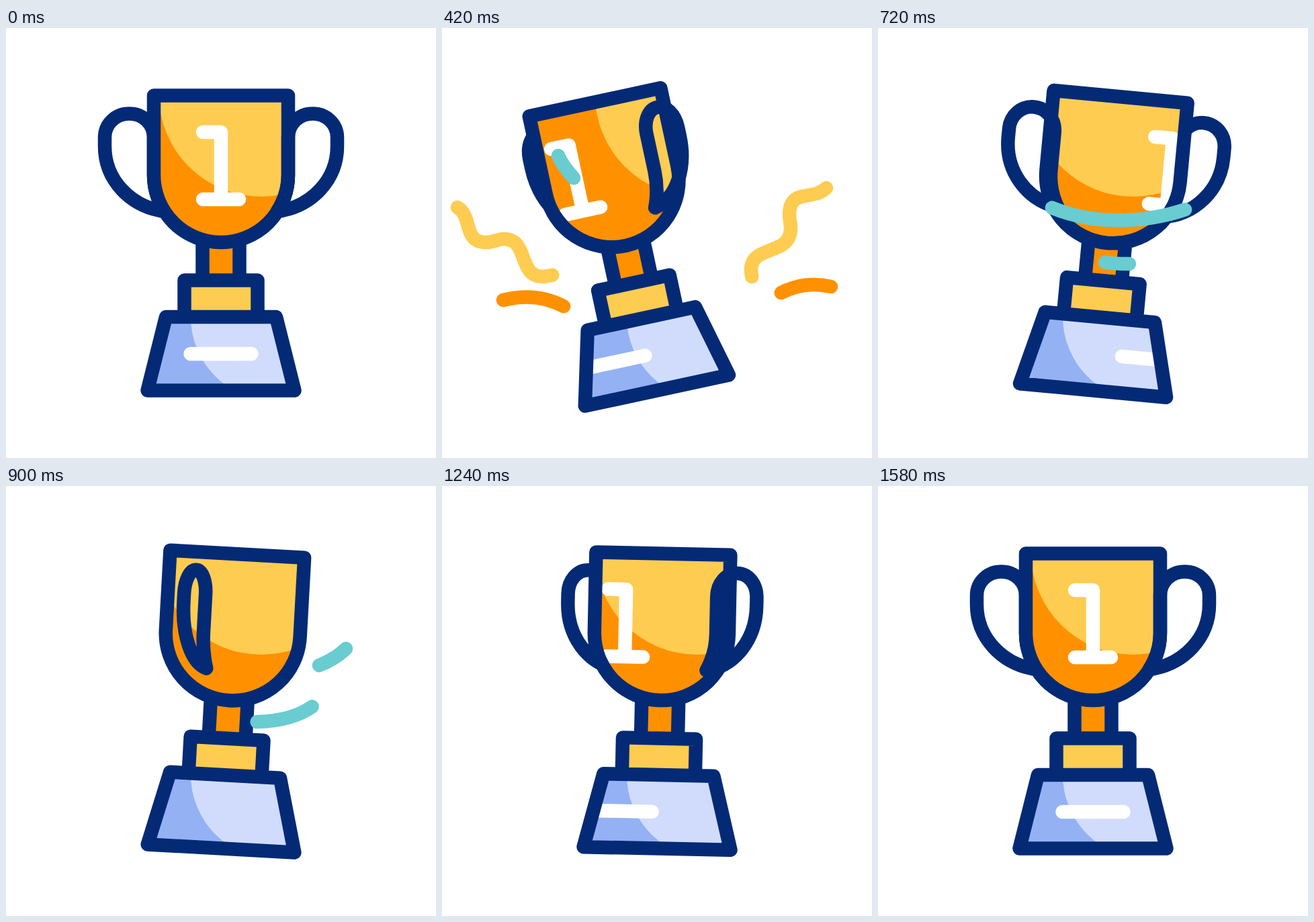
These frames come from a looping animation (640x640 px, 2400 ms). An HTML page:

```html
<!DOCTYPE html>
<html lang="en">
<head>
<meta charset="utf-8">
<title>Trophy</title>
<style>
  html, body { margin: 0; width: 100%; height: 100%; overflow: hidden; background: #fff; }
  svg { display: block; width: 100vw; height: 100vh; }
  path { fill: none; stroke-width: 20.5; stroke-linecap: round; stroke-linejoin: round; }
  .line { stroke: #042a76; }
  .mark { stroke: #fff; }
  .orange { fill: #ff9100; }
  .yellow { fill: #fecc51; }
  .blue { fill: #94b1f3; }
  .pale { fill: #d1dcfc; }
</style>
</head>
<body>
<svg viewBox="0 0 640 640">
  <defs>
    <clipPath id="cupClip"><path d="M220 100.500H420V219A100 100 0 0 1 220 219Z"/></clipPath>
    <clipPath id="baseClip"><path d="M238 430H402L429.500 539.500H210.500Z"/></clipPath>
  </defs>
  <g id="trophy">
    <path id="back" class="line"/>
    <g clip-path="url(#baseClip)">
      <rect class="blue" x="200" y="420" width="240" height="130"/>
      <circle class="pale still" cx="400" cy="430" r="125"/>
      <path class="mark slide" d="M274.500 485H365.500"/>
    </g>
    <rect class="yellow" x="265" y="375" width="110" height="55"/>
    <rect class="orange" x="292" y="315" width="55" height="60"/>
    <g clip-path="url(#cupClip)">
      <rect class="orange" x="210" y="90" width="220" height="240"/>
      <circle class="yellow still" cx="380" cy="98.500" r="152.500"/>
      <path class="mark slide" d="M293 155H320V255M293 255H347"/>
    </g>
    <path class="line" d="M220 100.500H420V219A100 100 0 0 1 220 219Z
      M292.500 319V375M347.500 319V375
      M265.500 430V375.500H374.500V430
      M238 430H402L429.500 539.500H210.500Z"/>
    <path id="front" class="line"/>
  </g>
  <g id="streaks"></g>
</svg>
<script>
const LOOP = 2400, CX = 320;
const $ = s => document.querySelector(s);
const all = s => document.querySelectorAll(s);
const clamp = x => Math.min(1, Math.max(0, x));
const ease = x => { x = clamp(x); return x * x * (3 - 2 * x); };
const span = (t, [a, b]) => ease((t - a) / (b - a));

// Sway: time in ms, angle in degrees
const SWAY = [[0, 0], [365, -13.1], [785, 6.6], [1090, -4], [1285, 2], [1580, 0]];
const WIND_UP = [0, 365], SPIN = 420;

function sway(t) {
  for (let i = 1; i < SWAY.length; i++) {
    const [t0, a] = SWAY[i - 1], [t1, b] = SWAY[i];
    if (t < t1) return a + (b - a) * span(t, [t0, t1]);
  }
  return 0;
}

// Horizontal squash of the front handle: wind up, then half a turn
function turn(t) {
  if (t < SPIN) return 1 - 0.35 * span(t, WIND_UP);
  const deg = Math.max(-180, 49.5 - 0.236 * (t - SPIN));
  const c = Math.cos(deg * Math.PI / 180);
  return deg > 0 ? c : -c;
}

// Offset of the white marks, which leave on the right and return on the left
function slide(t) {
  const wrap = 340, wind = 52;
  if (t < SPIN) return -wind * span(t, WIND_UP);
  const x = clamp((t - SPIN) / 980);
  const pos = (wrap + wind) * x * (1.18 - 0.18 * x) - wind;
  return pos > wrap / 2 ? pos - wrap : pos;
}

function handle(s) {
  const p = (x, y) => `${(CX + s * x).toFixed(2)} ${y} `;
  return 'M' + p(100, 163) +
    'C' + p(100, 143) + p(116, 127.5) + p(136.5, 127.5) +
    'C' + p(157, 127.5) + p(173, 143) + p(173, 163) +
    'L' + p(173, 176) +
    'C' + p(173, 225) + p(136, 266) + p(83.5, 273) +
    'C' + p(94, 257) + p(100, 239) + p(100, 219) + 'Z';
}

const BURST = { head: [0, 420], tail: [296, 640] };
const STREAKS = [
  { color: '#fecc51', ...BURST,
    d: 'M221 417C200 405 215 366 180 366C166 366 158 370 150 370C112 370 130 314 92 314C82 314 77 319 66 319C30 319 46 280 23 267' },
  { color: '#fecc51', ...BURST,
    d: 'M406 423C420 398 462 414 462 378C462 372 460 366 460 360C460 322 519 340 519 298C519 290 517 286 517 278C517 238 552 258 572 238' },
  { color: '#ff9100', ...BURST, d: 'M213 438C175 400 130 395 91 405' },
  { color: '#ff9100', ...BURST, d: 'M478 413C508 385 545 377 579 385' },
  { color: '#68ccd1', head: [310, 855], tail: [555, 1000],
    d: 'M173 190C178 202 186 212 195 222C212 243 234 258 260 268C322 293 396 291 458 270C478 263 494 254 506 242' },
  { color: '#68ccd1', head: [580, 1020], tail: [780, 1160],
    d: 'M338 349C350 351 362 351 374 351C412 350 452 340 475 310' }
];

for (const s of STREAKS) {
  s.el = document.createElementNS('http://www.w3.org/2000/svg', 'path');
  s.el.setAttribute('d', s.d);
  s.el.setAttribute('stroke', s.color);
  $('#streaks').append(s.el);
  s.len = s.el.getTotalLength();
}

function drawStreak(s, t) {
  const from = span(t, s.tail) * s.len, to = span(t, s.head) * s.len;
  const shown = to - from > 0.5;
  s.el.style.display = shown ? '' : 'none';
  if (!shown) return;
  s.el.setAttribute('stroke-dasharray', `${to - from} ${s.len * 2}`);
  s.el.setAttribute('stroke-dashoffset', -from);
}

const still = all('.still'), marks = all('.slide');
const move = (el, v) => el.setAttribute('transform', v);

function draw(t) {
  const a = sway(t), s = turn(t), x = slide(t);
  move($('#trophy'), `rotate(${a} ${CX} 540)`);
  still.forEach(el => move(el, `rotate(${-a} ${CX} 540)`));
  marks.forEach(el => move(el, `translate(${x} 0)`));
  $('#front').setAttribute('d', handle(s));
  $('#back').setAttribute('d', handle(-s));
  STREAKS.forEach(st => drawStreak(st, t));
}

const start = performance.now();
function tick() {
  draw((performance.now() - start) % LOOP);
  requestAnimationFrame(tick);
}
draw(0);
requestAnimationFrame(tick);
</script>
</body>
</html>
```
